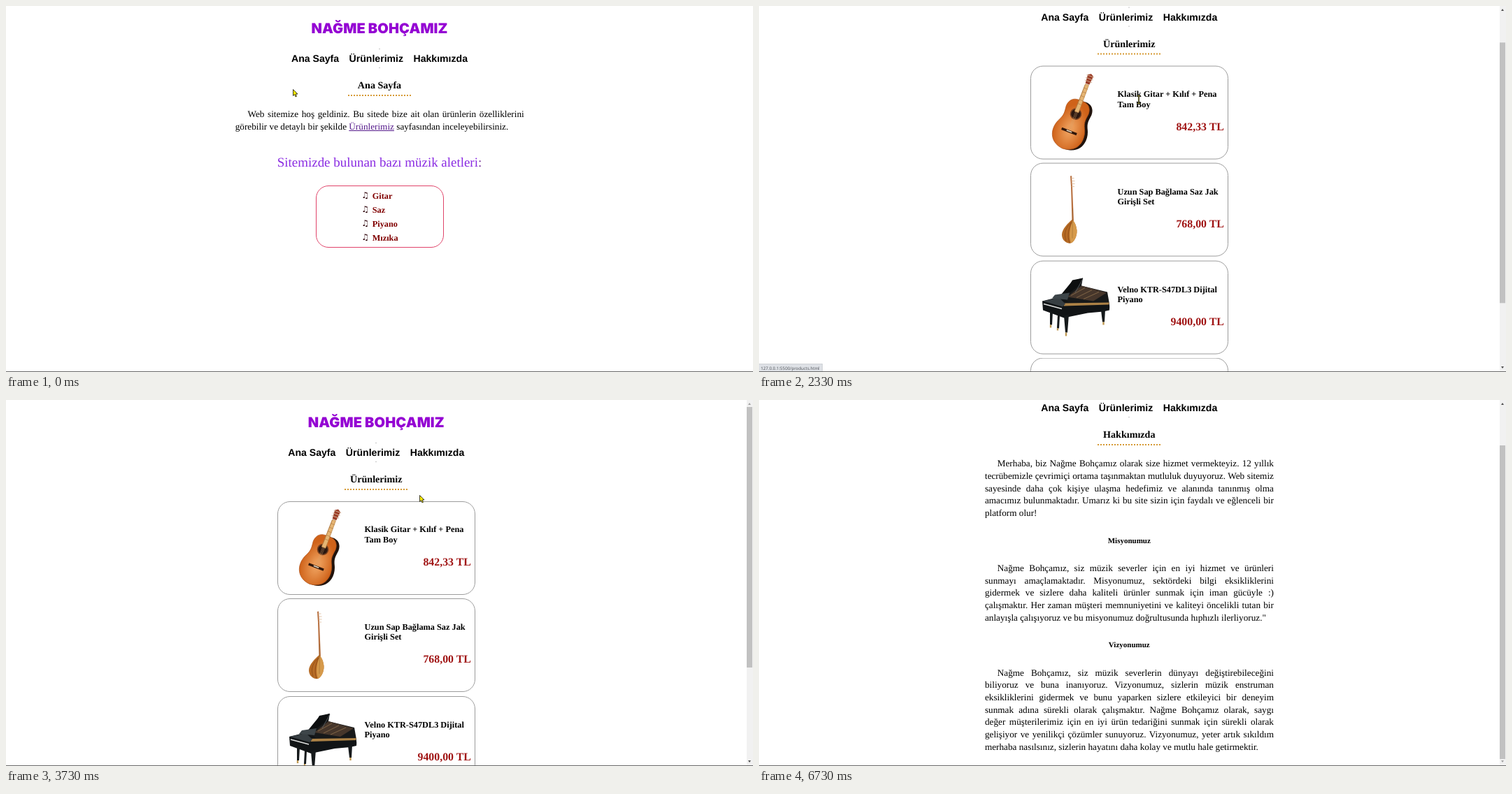
Recreate the animation shown at these times as an HTML page. Size 1068 px wide and 524 px high, loop 6.79 s.

```html
<!DOCTYPE html>
<html lang="tr">
<head>
<meta charset="utf-8">
<title>Nağme Bohçamız</title>
<style>
:root { --loop: 6790ms; }
html, body { margin: 0; width: 100%; height: 100%; overflow: hidden; background: #fff; }
#stage { position: relative; width: 1068px; height: 524px; overflow: hidden; background: #fff;
  font: 13.22px/17.67px "Liberation Serif", serif; color: #000; text-rendering: geometricPrecision; }
#stage * { animation-duration: var(--loop); animation-iteration-count: infinite; animation-timing-function: step-end; }
.page, .view, .abs, .thumb, .status, #cursor, #cursor svg, .edge { position: absolute; }
.page { inset: 0; }
.view { left: 0; top: 0; width: 1058.5px; height: 100%; }
#home .view { width: 1068px; }
#home { animation-name: show-home; }
#shop { animation-name: show-shop; }
#about { animation-name: show-about; }
#stage .scroll { animation-timing-function: linear; }
#shop .view { animation-name: scroll-shop; }
#about .view { animation-name: scroll-about; }

h1, h2, h3, p, nav { position: absolute; left: 0; right: 0; margin: 0; text-align: center; white-space: nowrap; }
h1 { top: 19.5px; font: 900 20px/24px Inter, sans-serif; letter-spacing: .1px; color: #9400d3; }
nav { top: 66px; display: flex; justify-content: center; gap: 14.4px;
  font: bold 14.1px/18px "Liberation Sans", Arial, sans-serif; }
nav::before, nav::after { content: ""; position: absolute; left: 50%; width: 2px; height: 1px; margin-left: -1px; background: #c4c4c4; }
nav::before { top: -5px; }
nav::after { top: 22px; }
h2 { top: 103.5px; font-size: 14.1px; line-height: 20px; }
h2::after { content: ""; position: absolute; left: 50%; top: 23.5px; width: 90px; margin-left: -45px; border-top: 2px dotted #d69a35; }
h3 { font-size: 11px; line-height: 14px; }
p { left: 50%; right: auto; width: 413px; margin-left: -206.3px; text-align: left; }
p span { display: block; text-align-last: justify; }
p span:first-child { text-indent: 17.8px; }
p span:last-child { text-align-last: left; text-indent: 0; }
p u { color: #551a8b; }
.lead { left: 0; right: 0; top: 214px; text-align: center; font-size: 18.95px; line-height: 22px; color: #8a2be2; }
.lead b { font-weight: normal; color: #7a3c9a; }
.list { left: 442.5px; top: 256.8px; width: 181.5px; height: 87px; border: 1px solid #e0446a; border-radius: 18px; }
.list div { position: relative; left: 80.3px; top: 4px; height: 20.15px; font: bold 12.25px/20px "Liberation Serif", serif; color: #800000; }
.list div::before { content: "♫"; position: absolute; left: -15.5px; font: 12px/19px "DejaVu Sans", sans-serif; color: #2b0008; }

.card { left: 387.5px; width: 281.8px; height: 131.8px; border: 1px solid #9c9c9c; border-radius: 18px; background: #fff; }
.card svg { position: absolute; left: -1px; top: -1px; }
.card b { position: absolute; left: 124px; font-size: 12.3px; line-height: 14.5px; white-space: nowrap; }
.card em { position: absolute; right: 5.5px; font: bold 15.85px/18px "Liberation Serif", serif; color: #a01414; }

.bar { position: absolute; left: 1058.5px; top: 0; width: 9.5px; height: 523px; background: #f1f1f1; }
.thumb { left: .8px; top: 10px; width: 8px; background: #c1c1c1; }
#shop .thumb { height: 373px; animation-name: thumb-shop; }
#about .thumb { height: 449px; animation-name: thumb-about; }
.bar i { position: absolute; left: 2.4px; border: 2.4px solid transparent; color: #505050; }
.bar .up { top: 1.6px; border-bottom: 3px solid; }
.bar .down { bottom: 1.6px; border-top: 3px solid; }
#shop .up { animation-name: up-shop; }
#shop .down { animation-name: down-shop; }
#about .up { animation-name: up-about; }
#about .down { animation-name: down-about; }

.status { left: 0; top: 511.5px; width: 91px; height: 12px; background: #dee1e6; border-top: 1px solid #cfd2d6; border-right: 1px solid #cfd2d6;
  box-sizing: border-box; padding-left: 2.5px; font: 6.15px/11px "Open Sans", sans-serif; color: #50545a; white-space: nowrap; opacity: 0; }
#stage .status { animation-timing-function: linear; }
#status-shop { animation-name: status-shop; }
#status-about { animation-name: status-about; }
.edge { left: 0; top: 523px; width: 100%; height: 1px; background: #6a6a6a; }

#home a:nth-child(2) { animation-name: hover-home; }
#shop a:nth-child(2) { animation-name: hover-shop; }
#shop a:nth-child(3) { animation-name: hover-leave; }
#about a:nth-child(3) { animation-name: hover-about; }

#stage #cursor { left: 0; top: 0; animation-name: move; animation-timing-function: ease-in-out; }
#cursor svg { overflow: visible; fill: #ffee00; stroke: #111; stroke-width: .8; width: 1px; height: 1px; visibility: hidden; }
#cursor .arrow { animation-name: arrow; }
#cursor .hand { animation-name: hand; }
#cursor .beam { animation-name: beam; }

@keyframes show-home { 0% { visibility: visible } 20.62%, 100% { visibility: hidden } }
@keyframes show-shop { 0% { visibility: hidden } 20.62% { visibility: visible } 64.8%, 100% { visibility: hidden } }
@keyframes show-about { 0% { visibility: hidden } 64.8%, 100% { visibility: visible } }

@keyframes scroll-shop {
  0%, 32.4% { transform: none } 33.43% { transform: translateY(-22px) } 34.32% { transform: translateY(-59px) }
  36.38% { transform: translateY(-152px) } 37.26% { transform: translateY(-176px) }
  38.29%, 50.07% { transform: translateY(-184px) } 51.1% { transform: translateY(-158px) }
  53.02% { transform: translateY(-44px) } 54.05% { transform: translateY(-9px) } 54.93%, 100% { transform: none }
}
@keyframes thumb-shop {
  0%, 32.4% { transform: none } 33.43% { transform: translateY(15.7px) } 34.32% { transform: translateY(42px) }
  36.38% { transform: translateY(108.3px) } 37.26% { transform: translateY(125.4px) }
  38.29%, 50.07% { transform: translateY(131.1px) } 51.1% { transform: translateY(112.6px) }
  53.02% { transform: translateY(31.4px) } 54.05% { transform: translateY(6.4px) } 54.93%, 100% { transform: none }
}
@keyframes scroll-about {
  0%, 73.64% { transform: none } 75.55% { transform: translateY(-30px) }
  77.5% { transform: translateY(-59px) } 78.5%, 100% { transform: translateY(-64px) }
}
@keyframes thumb-about {
  0%, 73.64% { transform: none } 75.55% { transform: translateY(25.8px) }
  77.5% { transform: translateY(50.7px) } 78.5%, 100% { transform: translateY(55px) }
}
@keyframes up-shop { 0% { color: #a3a3a3 } 32.4% { color: #505050 } 54.93%, 100% { color: #a3a3a3 } }
@keyframes down-shop { 0% { color: #505050 } 38.29% { color: #a3a3a3 } 50.07%, 100% { color: #505050 } }
@keyframes up-about { 0% { color: #a3a3a3 } 73.64%, 100% { color: #505050 } }
@keyframes down-about { 0% { color: #505050 } 78.5%, 100% { color: #a3a3a3 } }

@keyframes status-shop { 0%, 10.31% { opacity: 0 } 13.1%, 36.6% { opacity: 1 } 38.2%, 100% { opacity: 0 } }
@keyframes status-about { 0%, 61.5% { opacity: 0 } 63.77%, 76.5% { opacity: 1 } 78.4%, 100% { opacity: 0 } }

@keyframes hover-home { 0% { color: #000 } 8.84%, 100% { color: #dc143c; text-decoration: underline } }
@keyframes hover-shop { 0% { color: #000 } 21.65% { color: #dc143c; text-decoration: underline } 28.57%, 100% { color: #000; text-decoration: none } }
@keyframes hover-leave { 0% { color: #000 } 58.9%, 100% { color: #dc143c; text-decoration: underline } }
@keyframes hover-about { 0% { color: #dc143c; text-decoration: underline } 69.8%, 100% { color: #000; text-decoration: none } }

@keyframes move {
  0%, 1.03% { transform: translate(410px, 119px) } 10.75% { transform: translate(518px, 79px) }
  13.6%, 27.54% { transform: translate(523px, 76px) } 33.43% { transform: translate(542px, 132px) }
  34.32% { transform: translate(543px, 134px) } 38.29% { transform: translate(551px, 142px) }
  41.24%, 44.18% { transform: translate(556px, 150px) } 45.21%, 50.07% { transform: translate(573px, 148px) }
  54.93% { transform: translate(591px, 136px) } 59.94%, 68.78% { transform: translate(612px, 77px) }
  71.72% { transform: translate(615px, 137px) } 78.5%, 79.53% { transform: translate(618px, 153px) }
  89.4% { transform: translate(183px, 521px) } 90.28%, 100% { transform: translate(182px, 526px) }
}
@keyframes arrow {
  0% { visibility: visible } 8.84% { visibility: hidden } 28.57% { visibility: visible } 33.43% { visibility: hidden }
  45.21% { visibility: visible } 58.9% { visibility: hidden } 69.8%, 100% { visibility: visible }
}
@keyframes hand {
  0% { visibility: hidden } 8.84% { visibility: visible } 28.57% { visibility: hidden }
  58.9% { visibility: visible } 69.8%, 100% { visibility: hidden }
}
@keyframes beam { 0% { visibility: hidden } 33.43% { visibility: visible } 45.21%, 100% { visibility: hidden } }
</style>
</head>
<body>
<div id="stage">
  <div class="page" id="home">
    <div class="view">
      <h2>Ana Sayfa</h2>
      <p style="top:146.3px">
        <span>Web sitemize hoş geldiniz. Bu sitede bize ait olan ürünlerin özelliklerini</span>
        <span>görebilir ve detaylı bir şekilde <u>Ürünlerimiz</u> sayfasından inceleyebilirsiniz.</span>
      </p>
      <div class="abs lead">Sitemizde bulunan bazı müzik aletleri<b>:</b></div>
      <div class="abs list"><div>Gitar</div><div>Saz</div><div>Piyano</div><div>Mızıka</div></div>
    </div>
  </div>

  <div class="page" id="shop">
    <div class="view scroll">
      <h2>Ürünlerimiz</h2>
      <div class="abs card" style="top:145.3px">
        <svg width="283" height="133">
          <defs>
            <radialGradient id="wood" cy=".6"><stop offset=".2" stop-color="#eb9a56"/><stop offset="1" stop-color="#cf6219"/></radialGradient>
            <path id="body" d="M0-20C11-22 17-15 17-6C16 3 15 7 19 15C27 30 23 51 0 53C-23 51-27 30-19 15C-15 7-16 3-17-6C-17-15-11-22 0-20Z"/>
          </defs>
          <g transform="translate(65 69) rotate(21)">
            <use href="#body" x="4.5" y="-.5" fill="#21130c"/>
            <use href="#body" fill="url(#wood)" stroke="#b4541a" stroke-width=".7"/>
            <circle r="7.5" fill="#2a1710" stroke="#77401f" stroke-width="1.6"/>
            <path d="M-3-3L-2.5-45H2.5L3-3Z" fill="#e5b574" stroke="#b57c3d" stroke-width=".6"/>
            <path d="M-2.7-8V-44M-3-15H3M-3-21H3M-3-27H3M-3-33H3M-3-39H3" stroke="#a56f38" stroke-width=".5"/>
            <path d="M-3-46L-4.2-59L0-61.5L4.2-59L3-46Z" fill="#9b3d27"/>
            <path d="M-5.5-50H5.5M-5.5-54H5.5M-5.5-58H5.5" stroke="#cfae92"/>
            <path d="M-11.5 25H11.5V28.5H-11.5Z" fill="#30160a"/>
            <path d="M-4 26.5H4" stroke="#e5d8c2" stroke-width="1.6"/>
            <path d="M-1.5-3V25M0-3V25M1.5-3V25" stroke="#d8a56e" stroke-width=".35"/>
          </g>
        </svg>
        <b style="top:32px">Klasik Gitar + Kılıf + Pena<br>Tam Boy</b><em style="top:78px">842,33 TL</em>
      </div>

      <div class="abs card" style="top:284.4px">
        <svg width="283" height="133">
          <path d="M57 19L59 18.5L60 34L62 84H59.5L58 34Z" fill="#b87040"/>
          <path d="M58.5 22H62.5M59 26H63.5M59 30H63.5M59 34H63" stroke="#dcb896" stroke-width=".8"/>
          <path d="M60 81C54 86 45 95 45 103C45 112 53 116 58 115C64 113 68 101 66 94C65 88 63 85 60 81Z" fill="#b66b25"/>
          <path d="M61 82C57 91 54 103 58 115C64 113 68 101 66 94C65 88 63 85 61 82Z" fill="#d69a4b"/>
          <path d="M59 85C51 92 47 100 51 112M59 85C55 93 52 104 56 115" fill="none" stroke="#8b4815" stroke-width=".8"/>
          <path d="M60.5 65L60 108" stroke="#8e632d" stroke-width=".5"/>
        </svg>
        <b style="top:32.5px">Uzun Sap Bağlama Saz Jak<br>Girişli Set</b><em style="top:78px">768,00 TL</em>
      </div>

      <div class="abs card" style="top:424.3px">
        <svg width="283" height="133">
          <path d="M45 56L60 28L75 25L73 36L110 45L113 62L50 65Z" fill="#17191a"/>
          <path d="M53 52L73 36L109 46L90 58Z" fill="#46362b"/>
          <path d="M58 50L78 39M66 53L88 42M76 55L98 45" stroke="#9a7a52" stroke-width=".7"/>
          <path d="M42 51L60 29L75 25L71 35L52 49Z" fill="#0d0f10"/>
          <path d="M64 46L75 26" stroke="#60666a" stroke-width=".8"/>
          <path d="M17 58L45 51L55 60L111 60Q114 61 113 71L104 73L82 75L48 82L18 71Z" fill="#111416"/>
          <path d="M46 61L113 60L112 63L48 65Z" fill="#ad8246"/>
          <path d="M18 58L41 53L50 62L46 66Z" fill="#373e42"/>
          <path d="M19 62L45 69" stroke="#dfe0df" stroke-width="1.6"/>
          <path d="M35 49L56 46L53 56L31 54Z" fill="#3d4549"/>
          <path d="M28 72L32 73L31 92H28ZM48 79L55 77L53 103H50ZM39 78L42 79L41 97H38ZM101 71L107 70L106 88H103Z" fill="#15191b"/>
          <path d="M29 92V96M51 103V108M39 97V100M104.5 88V92" stroke="#c09a53" stroke-width="2.4"/>
        </svg>
        <b style="top:32.5px">Velno KTR-S47DL3 Dijital<br>Piyano</b><em style="top:78px">9400,00 TL</em>
      </div>

      <div class="abs card" style="top:563.3px">
        <svg width="283" height="133">
          <path d="M18 68L28 61L116 54V62L32 85L20 78Z" fill="#c86f31" stroke="#713817" stroke-width=".7"/>
          <path d="M18 68L32 75L116 54V62L32 85L20 78Z" fill="#b65c24"/>
          <path d="M42 76L108 60" stroke="#552a14" stroke-width="6"/>
          <path d="M43 76L108 60" stroke="#b46a37" stroke-width="6" stroke-dasharray=".8 4.8"/>
          <path d="M42 76L108 60" stroke="#a45b2d" stroke-width=".8"/>
          <path d="M28 66L38 57L105 47Q112 47 113 52L104 61L43 75L30 74Q25 71 28 66Z" fill="#c9cacc" stroke="#77797b" stroke-width=".8"/>
          <circle cx="30" cy="70" r="1.5" fill="#eee" stroke="#777" stroke-width=".5"/>
          <circle cx="112" cy="54" r="1.5" fill="#eee" stroke="#777" stroke-width=".5"/>
        </svg>
        <b style="top:25.5px">DUNE VAX R3816 Pirinç<br>Gövde / 24 Delikli / Tremolo<br>Mızıka</b><em style="top:85.5px">303,33 TL</em>
      </div>
    </div>
    <div class="bar"><i class="up"></i><div class="thumb scroll"></div><i class="down"></i></div>
  </div>

  <div class="page" id="about">
    <div class="view scroll">
      <h2>Hakkımızda</h2>
      <p style="top:146.3px">
        <span>Merhaba, biz Nağme Bohçamız olarak size hizmet vermekteyiz. 12 yıllık</span>
        <span>tecrübemizle çevrimiçi ortama taşınmaktan mutluluk duyuyoruz. Web sitemiz</span>
        <span>sayesinde daha çok kişiye ulaşma hedefimiz ve alanında tanınmış olma</span>
        <span>amacımız bulunmaktadır. Umarız ki bu site sizin için faydalı ve eğlenceli bir</span>
        <span>platform olur!</span>
      </p>
      <h3 style="top:258.5px">Misyonumuz</h3>
      <p style="top:296px">
        <span>Nağme Bohçamız, siz müzik severler için en iyi hizmet ve ürünleri</span>
        <span>sunmayı amaçlamaktadır. Misyonumuz, sektördeki bilgi eksikliklerini</span>
        <span>gidermek ve sizlere daha kaliteli ürünler sunmak için iman gücüyle :)</span>
        <span>çalışmaktır. Her zaman müşteri memnuniyetini ve kaliteyi öncelikli tutan bir</span>
        <span>anlayışla çalışıyoruz ve bu misyonumuz doğrultusunda hıphızlı ilerliyoruz."</span>
      </p>
      <h3 style="top:408px">Vizyonumuz</h3>
      <p style="top:445.7px">
        <span>Nağme Bohçamız, siz müzik severlerin dünyayı değiştirebileceğini</span>
        <span>biliyoruz ve buna inanıyoruz. Vizyonumuz, sizlerin müzik enstruman</span>
        <span>eksikliklerini gidermek ve bunu yaparken sizlere etkileyici bir deneyim</span>
        <span>sunmak adına sürekli olarak çalışmaktır. Nağme Bohçamız olarak, saygı</span>
        <span>değer müşterilerimiz için en iyi ürün tedariğini sunmak için sürekli olarak</span>
        <span>gelişiyor ve yenilikçi çözümler sunuyoruz. Vizyonumuz, yeter artık sıkıldım</span>
        <span>merhaba nasılsınız, sizlerin hayatını daha kolay ve mutlu hale getirmektir.</span>
      </p>
    </div>
    <div class="bar"><i class="up"></i><div class="thumb scroll"></div><i class="down"></i></div>
  </div>

  <div class="status" id="status-shop">127.0.0.1:5500/products.html</div>
  <div class="status" id="status-about">127.0.0.1:5500/about-us.html</div>
  <div class="edge"></div>
  <div id="cursor">
    <svg class="arrow"><path d="M.5.5V9.5L2.6 7.6L4 11L5.5 10.3L4.1 7H7Z"/></svg>
    <svg class="hand"><path d="M-1.5.5Q-.5-.8.5.5V4L4 5Q5 5.5 4.8 7L4 11.5H-1.5L-4.3 7.5Q-4.6 6-3 6.2L-1.5 7.5Z"/></svg>
    <svg class="beam"><path d="M-2.5-5.5H2.5M-2.5 5.5H2.5M0-5.5V5.5" stroke-width="1.8"/><path d="M-2-5.5H2M-2 5.5H2M0-5.5V5.5" stroke="#d8cc4a" stroke-width=".6"/></svg>
  </div>
</div>
<script>
const header = `<h1>NAĞME BOHÇAMIZ</h1>
  <nav><a>Ana Sayfa</a><a>Ürünlerimiz</a><a>Hakkımızda</a></nav>`;
document.querySelectorAll('.view').forEach(view => view.insertAdjacentHTML('afterbegin', header));
</script>
</body>
</html>
```
